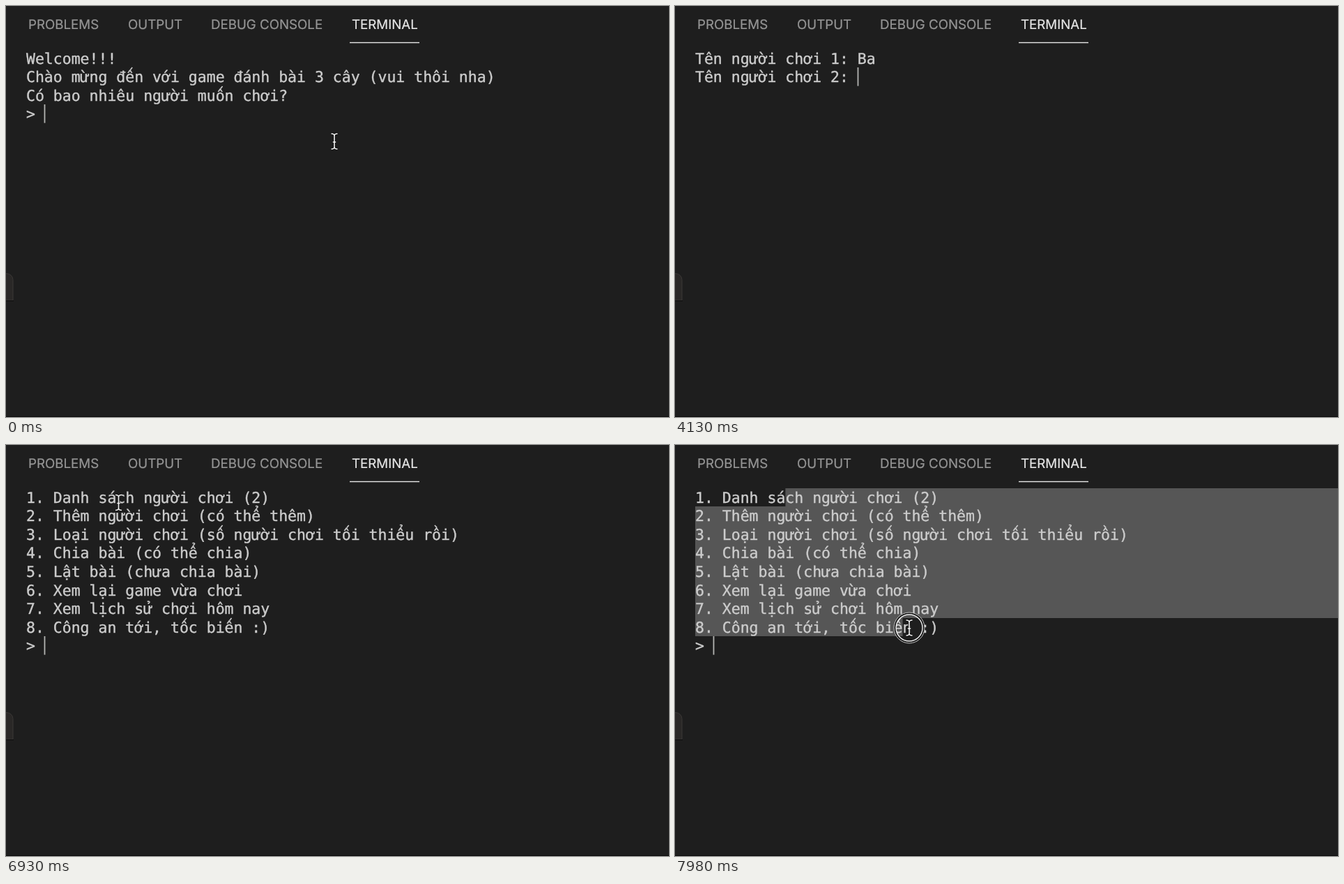
An HTML page with a canvas for the animation above (8 s loop, 951 by 589 pixels).

```html
<!DOCTYPE html>
<html lang="vi">
<head>
<meta charset="utf-8">
<style>
  html, body { margin: 0; width: 100%; height: 100%; overflow: hidden; background: #1e1e1e; }
  canvas { display: block; }
</style>
</head>
<body>
<canvas id="stage" width="951" height="589"></canvas>
<script>
const ctx = document.getElementById('stage').getContext('2d');
const WIDTH = 951, HEIGHT = 589, LOOP = 8000;
const CELL = 12.938, ROW = 26.62, LEFT = 29, TOP = 62, BASELINE = 21;
const FONT = '21.49px "DejaVu Sans Mono", monospace';

const TABS = [['PROBLEMS', 32], ['OUTPUT', 175], ['DEBUG CONSOLE', 294], ['TERMINAL', 496]];
const WELCOME = [
  'Welcome!!!',
  'Chào mừng đến với game đánh bài 3 cây (vui thôi nha)',
  'Có bao nhiêu người muốn chơi?',
  '> '
];
const MENU = [
  '1. Danh sách người chơi (2)',
  '2. Thêm người chơi (có thể thêm)',
  '3. Loại người chơi (số người chơi tối thiểu rồi)',
  '4. Chia bài (có thể chia)',
  '5. Lật bài (chưa chia bài)',
  '6. Xem lại game vừa chơi',
  '7. Xem lịch sử chơi hôm nay',
  '8. Công an tới, tốc biến :)',
  '> '
];
const ASK_1 = 'Tên người chơi 1: ', ASK_2 = 'Tên người chơi 2: ';

// [time, value] steps for each typed answer
const COUNT = [[0, ''], [210, '2']];
const NAME_1 = [[0, ''], [1960, 'B'], [2240, 'Ba']];
const NAME_2 = [[0, ''], [4200, 'B'], [4340, 'Be'], [4480, 'Bé'], [4620, 'Béo']];

// [time, x, y] pointer waypoints
const POINTER = [
  [0, 471, 194], [140, 471, 194], [280, 463, 190], [6230, 463, 190],
  [6440, 395, 172], [6650, 270, 125], [6860, 166, 85], [6930, 161.5, 82.5],
  [7070, 162, 81], [7210, 162, 81], [7280, 183, 112], [7350, 224, 164],
  [7420, 260, 205.5], [7560, 298, 233], [7770, 326, 255], [7980, 336, 262]
];
const HIDDEN_FROM = 1960, HIDDEN_TO = 6230, PRESS = 7070, SELECT = 7280, LAG = 40;
const ANCHOR_COL = 10;

// Tone marks that sit on top of a circumflex or a horned letter
const STACKED = /[ếểốồử]/g;
const TONES = {
  '\u0300': new Path2D('M-2.8 -3.4 L0.4 0'),
  '\u0301': new Path2D('M3.4 -3.4 L0.6 0'),
  '\u0309': new Path2D('M-1 -3.6 Q2.6 -4.4 2.2 -2.6 Q1.8 -1.4 0.6 -1.2 L0.6 0')
};

const rowTop = row => Math.floor(TOP + row * ROW);

function stepValue(steps, t) {
  return steps.filter(([at]) => at <= t).pop()[1];
}

function pointerAt(t) {
  const next = POINTER.findIndex(([at]) => at > t);
  if (next < 0) return POINTER[POINTER.length - 1].slice(1);
  const [t0, x0, y0] = POINTER[next - 1], [t1, x1, y1] = POINTER[next];
  const k = (t - t0) / (t1 - t0);
  return [x0 + (x1 - x0) * k, y0 + (y1 - y0) * k];
}

function screenAt(t) {
  if (t < 980) return [...WELCOME.slice(0, 3), '> ' + stepValue(COUNT, t)];
  if (t < 3640) return [ASK_1 + stepValue(NAME_1, t)];
  if (t < 5600) return [ASK_1 + 'Ba', ASK_2 + stepValue(NAME_2, t)];
  return MENU;
}

// Slightly thickened text, as with font smoothing
function drawText(text, x, y, color, weight) {
  ctx.fillStyle = ctx.strokeStyle = color;
  ctx.lineWidth = weight;
  ctx.fillText(text, x, y);
  ctx.strokeText(text, x, y);
}

function drawLine(line, y) {
  const marks = [];
  const text = line.replace(STACKED, (char, col) => {
    const [base, modifier, tone] = char.normalize('NFD');
    marks.push([col, tone, modifier === '\u031b' ? 14 : 17.6]);
    return (base + modifier).normalize('NFC');
  });
  drawText(text, LEFT, y, '#cccccc', 0.4);
  ctx.lineWidth = 1.6;
  for (const [col, tone, lift] of marks) {
    ctx.save();
    ctx.translate(LEFT + (col + 0.5) * CELL, y - lift);
    ctx.stroke(TONES[tone]);
    ctx.restore();
  }
}

function drawTabs() {
  ctx.font = '18.7px Inter, sans-serif';
  TABS.forEach(([label, x], i) => drawText(label, x, 33.3, i === 3 ? '#e7e7e7' : '#969696', 0.2));
  ctx.fillStyle = '#e7e7e7';
  ctx.fillRect(493, 51.8, 100, 1.4);
}

function drawEdges() {
  ctx.beginPath();
  ctx.roundRect(-10, 383.5, 20, 38.5, [0, 9, 0, 0]);
  ctx.fillStyle = '#2a2827';
  ctx.fill();
  ctx.strokeStyle = '#3b3836';
  ctx.lineWidth = 1;
  ctx.stroke();
  ctx.fillStyle = '#0c0c0c';
  ctx.fillRect(0, 422, 11, 1);
  ctx.fillRect(0, HEIGHT - 1, WIDTH, 1);
}

function drawSelection(t) {
  const [x, y] = pointerAt(t - LAG);
  const endRow = Math.max(0, Math.min(7, Math.floor((y - TOP) / ROW)));
  const endCol = Math.floor((x - LEFT) / CELL);
  ctx.fillStyle = '#565656';
  for (let row = 0; row <= endRow; row++) {
    const x0 = LEFT + (row ? 0 : ANCHOR_COL * CELL);
    const x1 = row < endRow ? WIDTH : LEFT + endCol * CELL;
    if (x1 > x0) ctx.fillRect(x0, rowTop(row), x1 - x0, rowTop(row + 1) - rowTop(row));
  }
}

function drawScreen(lines) {
  ctx.font = FONT;
  lines.forEach((line, row) => drawLine(line, rowTop(row) + BASELINE));
  const last = lines.length - 1;
  ctx.fillStyle = '#b4b5b3';
  ctx.fillRect(LEFT + lines[last].length * CELL - 0.3, rowTop(last), 1.8, ROW);
}

function drawRing(x, y, scale) {
  for (const [radius, color, width] of [[20.5, '#151515', 3], [22, '#c4c4c4', 1], [19, '#f0f0f0', 1.4]]) {
    ctx.beginPath();
    ctx.arc(x, y, radius * scale, 0, Math.PI * 2);
    ctx.strokeStyle = color;
    ctx.lineWidth = width;
    ctx.stroke();
  }
}

function drawBeam(x, y) {
  const beam = new Path2D();
  for (const side of [-1, 1]) {
    for (const end of [-1, 1]) {
      beam.moveTo(x + side * 4.5, y + end * 11);
      beam.quadraticCurveTo(x, y + end * 11, x, y + end * 8);
    }
  }
  beam.moveTo(x, y - 8.5);
  beam.lineTo(x, y + 8.5);
  beam.moveTo(x - 2.2, y + 1);
  beam.lineTo(x + 2.2, y + 1);
  for (const [color, width] of [['#111111', 3.4], ['#f2f2f2', 1.6]]) {
    ctx.strokeStyle = color;
    ctx.lineWidth = width;
    ctx.stroke(beam);
  }
}

function draw(t) {
  ctx.fillStyle = '#1e1e1e';
  ctx.fillRect(0, 0, WIDTH, HEIGHT);
  drawTabs();
  drawEdges();
  if (t >= SELECT) drawSelection(t);
  drawScreen(screenAt(t));
  if (t >= HIDDEN_FROM && t < HIDDEN_TO) return;
  const [x, y] = pointerAt(t);
  if (t >= PRESS) drawRing(x, y, Math.min(1, 0.75 + (t - PRESS) / 280));
  drawBeam(x, y);
}

function tick(now) {
  draw(now % LOOP);
  requestAnimationFrame(tick);
}

ctx.textRendering = 'geometricPrecision';
ctx.lineJoin = 'round';
requestAnimationFrame(tick);
</script>
</body>
</html>
```
